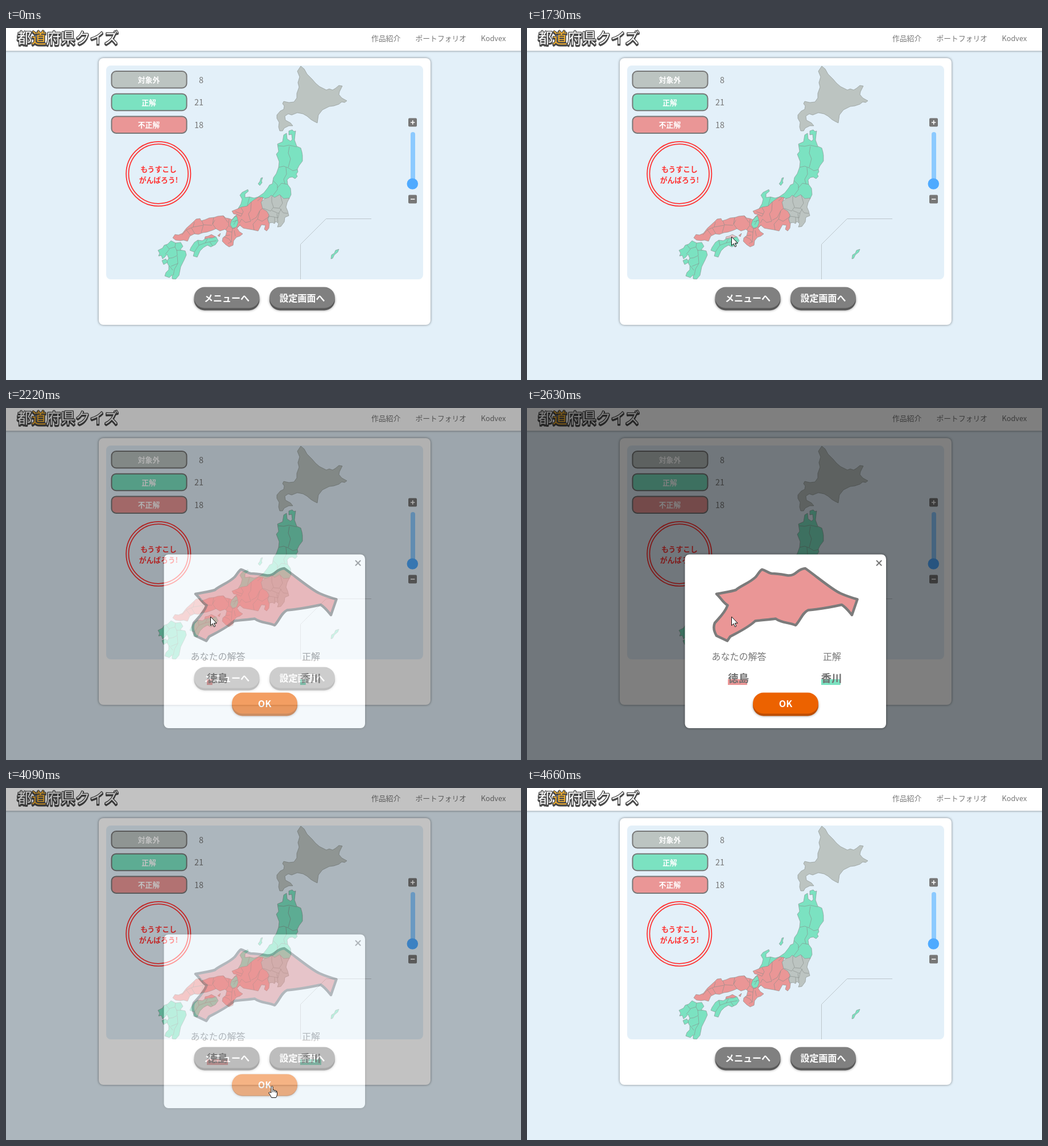
Recreate the animation shown at these times as an HTML page. Size 905x619 px, loop 4910 ms.

```html
<!DOCTYPE html>
<html lang="ja">
<head>
<meta charset="utf-8">
<title>都道府県クイズ</title>
<style>
html, body { margin: 0; width: 100%; height: 100%; overflow: hidden; background: #e3f0f9; }
svg { display: block; width: 905px; height: 619px; font-family: "Noto Sans CJK JP", "Noto Sans JP", "Noto Sans CJK", sans-serif; font-size: 12.8px; }
text { fill: #777; }
.bold { font-weight: 700; }
.white { fill: #fff; }
.mid { text-anchor: middle; }
.big { font-size: 16px; }
.count { font-size: 14.4px; font-weight: 500; text-anchor: end; }
.answer { font-size: 18.4px; font-weight: 700; fill: #707070; text-anchor: middle; }
.title { font-size: 25.6px; paint-order: stroke; stroke-linejoin: round; stroke: #4a4a4a; }
.shade { filter: drop-shadow(0 0 2px #0007); }
.map path { stroke: #858b89; stroke-width: .6; stroke-linejoin: round; }
.map .line { fill: none; }
.off { fill: #bcc4c1; }
.ok { fill: #7be2c1; }
.ng { fill: #ea9696; }
.red { fill: #f33; }
</style>
</head>
<body>
<svg viewBox="0 0 905 619">
  <defs>
    <clipPath id="mapClip"><rect x="176" y="66" width="557" height="376" rx="8"/></clipPath>
  </defs>
  <rect width="905" height="619" fill="#e3f0f9"/>

  <rect class="shade white" x="-9" y="-9" width="923" height="49"/>
  <g class="title">
    <text x="19.5" y="28.5" stroke-width="3" style="fill:#4a4a4a">都道府県クイズ</text>
    <text x="19.5" y="26.5" stroke-width="2.6" class="white">都<tspan fill="#fbb52f">道</tspan>府県クイズ</text>
  </g>
  <text x="642" y="23">作品紹介</text>
  <text x="719.5" y="23">ポートフォリオ</text>
  <text x="834.5" y="23">Kodvex</text>

  <rect class="shade white" x="163" y="53" width="583" height="469" rx="8"/>
  <rect x="176" y="66" width="557" height="376" rx="8" fill="#e3f0f9"/>

  <g class="map" clip-path="url(#mapClip)">
    <path class="line" style="stroke:#bcc6cc;stroke-width:1" d="M517.5 442V380.5L562.5 335.5H642"/>
    <!-- Hokkaido -->
    <path class="off" d="M518 67L524 72 529 81 538 90 544 97 551 103 557 106 563 109 568 107 574 109 579 106 585 101 591 102 586 112 585 117 590 123 599 128 595 131 590 130 585 134 576 137 568 138 556 144 549 153 547 167 541 164 536 161 529 155 522 151 512 149 502 153 496 151 490 155 491 162 500 167 504 172 497 172 489 176 486 181 481 181 479 174 480 166 476 159 476 153 482 146 488 143 489 137 486 133 488 129 497 131 506 130 511 123 511 115 515 104 513 96 516 86 512 76Z"/>
    <!-- Tohoku and Hokuriku -->
    <path class="ok" d="M497 181L503 179 506 182 509 181 508 188 507 197 511 208 518 211 520 218 521 224 521 234 515 242 512 248 513 253 510 257 512 261 508 265 503 262 498 263 494 267 495 275 500 282 501 293 497 301 488 301 480 295 471 299 466 296 460 301 452 299 444 301 436 308 430 306 424 313 412 317 407 319 413 309 415 301 411 294 415 289 425 284 426 287 420 292 420 298 428 297 436 299 443 297 453 290 460 281 463 276 468 274 470 263 475 256 479 245 480 235 475 222 479 217 477 204 486 200 488 188 493 185 494 195 500 199 503 196 502 187 497 188Z"/>
    <path class="ok" d="M448 264L451 263 449 269 450 272 446 277 443 274 446 270Z"/>
    <!-- Chubu, Kinki, Chugoku -->
    <path class="ng" d="M397 322L407 318 413 315 424 313 432 305 436 302 444 297 452 298 449 307 452 317 459 321 462 329 460 337 463 344 462 352 458 357 454 354 456 347 449 346 443 357 434 355 428 354 417 352 411 347 406 352 410 358 416 362 411 366 405 368 400 374 399 382 392 385 386 381 380 375 381 369 386 365 388 357 385 354 376 357 369 353 362 356 353 359 346 360 338 363 331 362 323 366 319 375 312 373 306 374 298 373 293 369 297 363 303 364 310 361 317 352 329 341 334 336 341 335 343 339 350 337 357 334 366 333 372 331 382 330 386 334 392 335 397 337 402 331 406 328 400 327Z"/>
    <path class="ng" d="M372 365L377 361 375 367Z"/>
    <path class="ok" d="M401 333L405 330 407 336 408 342 405 350 398 352 394 346 396 339Z"/>
    <!-- Kanto -->
    <path class="off" d="M448 306L455 300 462 298 466 294 472 298 481 293 488 300 498 299 494 307 492 315 495 322 497 330 490 333 489 341 483 349 477 350 479 344 474 340 472 344 468 342 462 343 460 336 463 330 458 322 451 318Z"/>
    <!-- Shikoku -->
    <path class="ok" d="M325 386L331 377 337 373 345 374 350 371 362 369 369 367 373 374 368 381 360 385 354 382 347 386 341 392 336 403 329 401 331 394 323 391Z"/>
    <path id="pref" class="ng" d="M349 371L350 367 355 366 361 363 368 367 363 369 355 369Z"/>
    <!-- Kyushu -->
    <path class="ok" d="M267 391L275 387 278 382 284 380 290 374 298 378 307 377 311 384 306 390 315 392 317 399 313 408 307 420 304 435 298 442 292 441 292 434 287 439 279 436 281 430 286 425 286 418 282 411 286 405 283 398 279 403 275 406 273 400 268 401 270 396Z"/>
    <path class="ok" d="M274 409L281 406 284 412 277 416Z"/>
    <path class="ok" d="M571 406L572 399 577 396 579 391 585 389 583 394 577 399 574 405Z"/>
    <!-- Borders -->
    <path class="line" d="M478 207L488 208 497 206 511 209M498 208L496 220 500 230 496 245M479 245L488 243 496 246 504 251 512 249M492 245L493 257 488 266 490 274M469 268L477 276 477 284 468 296M477 281L484 273 495 275M428 297L424 312M448 299L442 304"/>
    <path class="line" d="M413 316L417 323 413 331 406 328M431 306L430 321 426 327 430 340 421 342 414 336 410 343M431 338L440 333 446 321 451 317M446 322L442 336 434 345 436 355M442 336L450 340 462 332M403 323L415 327M398 341L407 338M400 346L405 337M406 351L412 346"/>
    <path class="line" d="M467 296L467 306 470 315 465 322 452 317M470 316L480 317 486 308 482 294M481 317L487 325 495 326M467 321L479 326 484 318M461 331L470 332 478 334 480 325M472 333L472 342M476 326L478 342"/>
    <path class="line" d="M392 336L391 347 398 353 403 352M391 348L386 355M382 331L390 342M388 357L397 359 398 353M397 359L396 376 390 379M401 356L403 366M383 367L392 371 396 377M386 365L394 364M365 333L363 345 369 353M363 345L367 338M344 339L347 346 343 360M347 346L362 347M331 341L329 350 317 355 309 364M326 352L332 362M329 350L346 347M317 355L324 364"/>
    <path class="line" d="M337 373L339 382 331 394M339 382L350 378 354 371M350 378L358 376 363 383M358 376L370 374M281 381L287 389 280 398M287 388L297 385 298 378M297 385L300 391 308 391M300 390L301 400 293 404 286 405M301 401L302 414 290 419M302 414L296 424 294 435M287 418L293 426"/>
  </g>

  <g id="legend"></g>

  <g fill="none" stroke="#f33" stroke-width="1.8">
    <circle cx="267.8" cy="256.5" r="56.6"/><circle cx="267.8" cy="256.5" r="52.3"/>
  </g>
  <g class="bold mid">
    <text class="red" x="268" y="253">もうすこし</text>
    <text class="red" x="268" y="271.5">がんばろう!</text>
  </g>

  <g fill="#777">
    <rect x="707" y="158.5" width="15" height="15" rx="2"/>
    <rect x="707" y="293.5" width="15" height="15" rx="2"/>
    <path d="M711 166h7.4M714.7 162.3v7.4M711 301h7.4" stroke="#fff" stroke-width="1.6"/>
  </g>
  <rect x="711" y="183" width="8" height="92" rx="4" fill="#8ccaff"/>
  <circle cx="714.3" cy="274" r="9.8" fill="#4faaff"/>

  <g id="buttons"></g>

  <g id="overlay">
    <rect width="905" height="619" fill="#000" opacity=".5"/>
    <rect class="shade white" x="277.5" y="257.5" width="353.5" height="305.5" rx="8"/>
    <path d="M614 268l9.2 9.2m0-9.2l-9.2 9.2" stroke="#777" stroke-width="2"/>
    <path class="ng" stroke="#7b7b7b" stroke-width="4.5" stroke-linejoin="round" d="M333 327C348 324 358 323 367 320C375 313 392 307 402 297C407 291 409 286 413 284C419 285 423 290 430 291C441 291 450 293 459 294.500C474 295 474 283 489 282C510 297 537 320 551 326C560 330 572 334 580.500 336.500L571 364C566 358 560 350 553 346C535 350 512 354 494 355.500C484 360 480 374 472 382C460 377 447 378 437 370.500C425 372 413 373 401 374.500C389 386 370 395 357 402L352 409.500 333 400.500C328 392 327 385 330 378C336 371 348 360 352.500 347C344 342 340 333 333 327Z"/>
    <g class="mid big">
      <text x="372.500" y="443">あなたの解答</text><text x="536" y="443">正解</text>
    </g>
    <rect id="markA" class="ng" x="353" y="477" height="10"/>
    <rect id="markB" class="ok" x="517" y="477" height="10"/>
    <text class="answer" x="371.700" y="482">徳島</text>
    <text class="answer" x="535.200" y="482">香川</text>
    <g id="confirm"></g>
  </g>

  <circle id="ripple" r="10" fill="#ffc400" opacity=".75"/>
  <g id="cursor" fill="#fff" stroke="#111" stroke-linejoin="round">
    <path id="arrow" d="M0 0V15.500L3.600 12.200 6 17.800 8.300 16.800 6 11.300H10.700Z"/>
    <path id="hand" d="M-1.500 1.500Q0-1 1.500 1.500V7Q3.500 6 4.500 8Q6.300 7 7 9Q9 8.500 9 11V15Q8.500 18 7 20.500H-1Q-2.500 16.500-6 12Q-4.500 9.500-1.500 12ZM1.500 7V11M4.500 8V11M7 9V12"/>
  </g>
</svg>
<script>
const LOOP = 4910;
const $ = id => document.getElementById(id);
const clamp = v => Math.min(1, Math.max(0, v));
const ramp = (t, start, length) => clamp((t - start) / length);

const legendRow = ([kind, label, count], i) => {
  const y = 76 + i * 39.7;
  return `<rect class="${kind}" x="185.5" y="${y}" width="132" height="29.500" rx="8" stroke="#777" stroke-width="2"/>
    <text class="bold white mid" x="251" y="${y + 20}">${label}</text>
    <text class="count" x="347" y="${y + 20.5}">${count}</text>`;
};
$('legend').innerHTML = [['off', '対象外', 8], ['ok', '正解', 21], ['ng', '不正解', 18]].map(legendRow).join('');

const pill = (x, y, label, face, edge) =>
  `<rect class="shade" x="${x}" y="${y + 4}" width="115" height="37" rx="18.500" fill="${edge}"/>
   <g class="face"><rect x="${x}" y="${y}" width="115" height="37" rx="18.500" fill="${face}"/>
   <text class="bold white mid big" x="${x + 57.5}" y="${y + 25}">${label}</text></g>`;
$('buttons').innerHTML = pill(330.5, 455.5, 'メニューへ', '#808080', '#585858') +
  pill(463, 455.5, '設定画面へ', '#808080', '#585858');
$('confirm').innerHTML = pill(397, 500.5, 'OK', '#ec6200', '#bd4d00');
const [okEdge, okFace] = $('confirm').children;

// CSS "ease" curve: cubic-bezier(.25, .1, .25, 1)
function ease(x) {
  const bezier = (a, b, s) => 3 * a * s * (1 - s) ** 2 + 3 * b * s * s * (1 - s) + s ** 3;
  let lo = 0, hi = 1;
  for (let i = 0; i < 20; i++) {
    const s = (lo + hi) / 2;
    if (bezier(.25, .25, s) < x) lo = s; else hi = s;
  }
  return bezier(.1, 1, lo);
}

// Cursor strokes as [time, x, y]
const strokes = [
  [[430, 842, 606], [600, 676, 494], [770, 528, 415], [940, 443, 374], [1140, 399, 358],
   [1300, 370, 356], [1420, 355, 362], [1500, 352, 368], [1610, 356, 370], [1730, 359.5, 367]],
  [[2650, 359.5, 367], [2760, 385, 407], [2900, 432, 484], [3080, 452, 516], [3200, 467.5, 524]],
  [[4100, 467.5, 524], [4200, 545, 540], [4390, 765, 588], [4530, 825, 608], [4660, 853, 621]]
];

// Hermite curve through the keys of one stroke
function along(keys, t) {
  const last = keys.length - 1;
  if (t >= keys[last][0]) return keys[last].slice(1);
  const i = Math.max(0, keys.findIndex(k => k[0] > t) - 1);
  const a = keys[i], b = keys[i + 1], span = b[0] - a[0];
  const u = clamp((t - a[0]) / span);
  const slope = (n, axis) => {
    const p = keys[Math.max(0, n - 1)], q = keys[Math.min(last, n + 1)];
    return (q[axis] - p[axis]) / (q[0] - p[0]) * span;
  };
  return [1, 2].map(axis =>
    a[axis] * (1 + 2 * u) * (1 - u) ** 2 + slope(i, axis) * u * (1 - u) ** 2 +
    b[axis] * u * u * (3 - 2 * u) + slope(i + 1, axis) * u * u * (u - 1));
}

const show = (id, on) => $(id).setAttribute('visibility', on ? 'visible' : 'hidden');

function draw(t) {
  const fade = ease(ramp(t, 2115, 300)) - ease(ramp(t, 4000, 300));
  $('overlay').setAttribute('opacity', fade);
  show('overlay', fade > 0.001);

  const mark = 37 * ramp(t, 2055, 630);
  $('markA').setAttribute('width', mark);
  $('markB').setAttribute('width', mark);

  const press = 2.7 * ease(ramp(t, 2950, 120));
  okFace.setAttribute('transform', `translate(0 ${press})`);
  okEdge.setAttribute('transform', `translate(0 ${press * 0.1})`);

  const hover = ramp(t, 1490, 200) - ramp(t, 2115, 150);
  $('pref').setAttribute('fill-opacity', 1 - 0.5 * hover);

  const stroke = strokes.filter(s => t >= s[0][0]).pop() || strokes[0];
  const [x, y] = along(stroke, t);
  $('cursor').setAttribute('transform', `translate(${x} ${y})`);
  const visible = t >= 430 && t < 4660;
  const pointing = t >= 2945 && t < 4150;
  show('arrow', visible && !pointing);
  show('hand', visible && pointing);

  $('ripple').setAttribute('cx', x);
  $('ripple').setAttribute('cy', y - 1);
  show('ripple', (t >= 2030 && t < 2150) || (t >= 3890 && t < 4020));
}

const begin = performance.now();
function tick() {
  draw((performance.now() - begin) % LOOP);
  requestAnimationFrame(tick);
}
tick();
</script>
</body>
</html>
```
